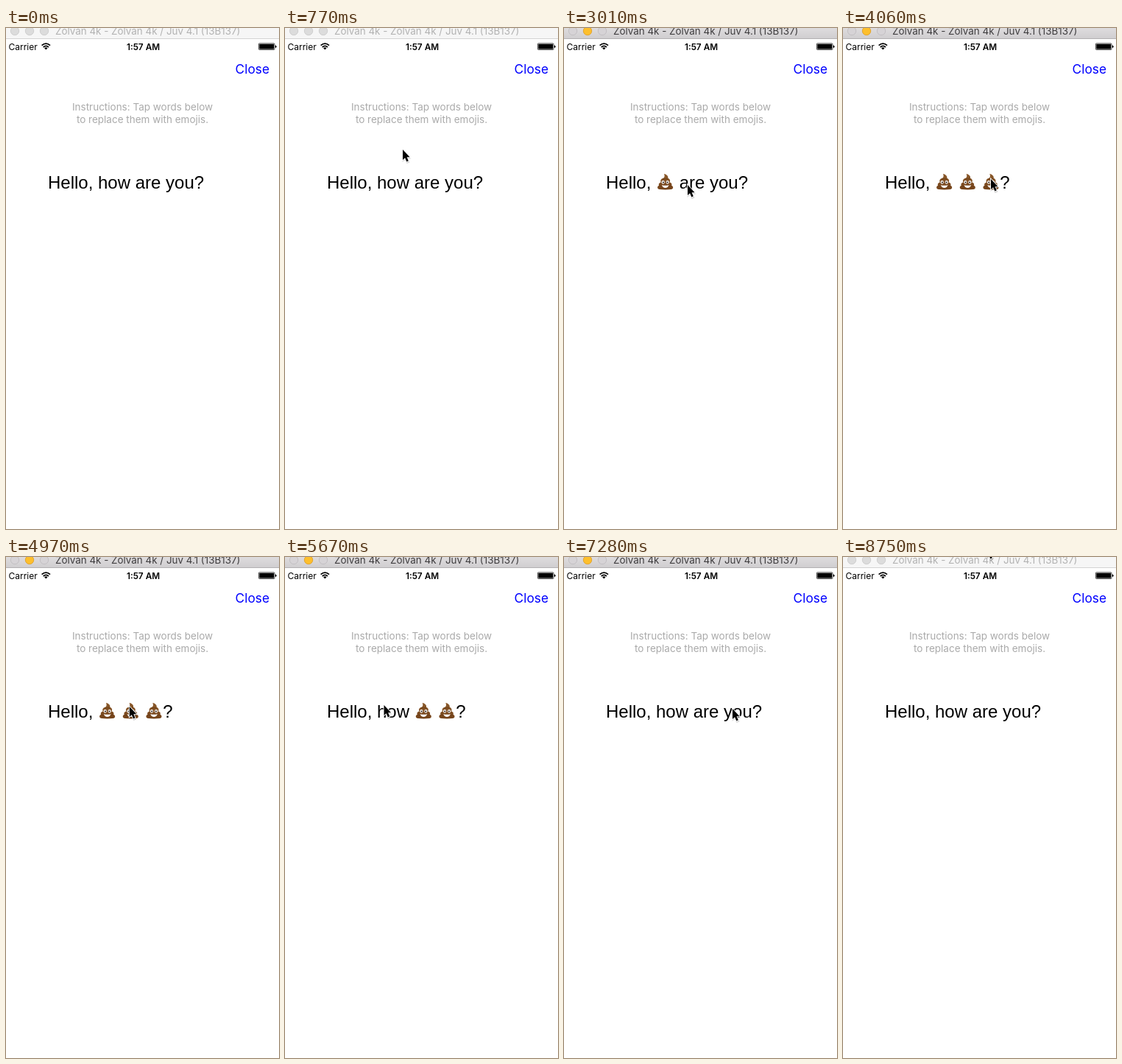
An HTML page that plays this animation: 371 by 680 pixels, repeating every 8890 ms.

```html
<!DOCTYPE html>
<html lang="en">
<head>
<meta charset="utf-8">
<title>Tap words to replace them</title>
<style>
html, body { margin: 0; width: 100%; height: 100%; overflow: hidden; background: #fff; }
svg { display: block; font-family: Inter, Roboto, sans-serif; }
.sentence { font: 24px "Liberation Sans", Arial, sans-serif; }
.hint { font-size: 13.5px; fill: #aaa; text-anchor: middle; }
#bar { fill: url(#chrome); }
#title { font-size: 13.4px; fill: #3e3c3e; }
#rule { fill: #b3b1b3; }
.light { fill: #d6d3d6; stroke: #c3c0c3; }
.middle { fill: #fdbf2d; stroke: #e2a532; }
.idle #bar { fill: #f6f6f6; }
.idle #title { fill: #b2b2b2; }
.idle #rule { fill: #d4d4d4; }
.idle .light { fill: #dcdcdc; stroke: #cfcfcf; }
</style>
</head>
<body>
<svg id="stage" class="idle" width="371" height="680" viewBox="0 0 371 680">
  <defs>
    <linearGradient id="chrome" x2="0" y2="1">
      <stop stop-color="#dedcde"/><stop offset="1" stop-color="#d0ced0"/>
    </linearGradient>
    <linearGradient id="brown" x2="0" y2="1">
      <stop stop-color="#8b5a2b"/><stop offset="1" stop-color="#74431a"/>
    </linearGradient>
    <g id="emoji">
      <path fill="url(#brown)" d="M9.2 0C13 .8 15.3 3 14.6 5.8C17.2 6.7 18.1 9 17 11.4C19.6 12 20.4 14 19.4 15.7C22.2 16.6 22.4 20.5 18.6 21C14 21.6 8 21.6 3.5 21C-.5 20.5-.4 16.6 2.4 15.7C1.4 13.8 2.4 12 4.9 11.4C4 9 5 6.9 7.6 6.1C9.8 5.4 10.6 3 9.2 0Z"/>
      <path fill="none" stroke="#57300f" stroke-width=".8" opacity=".6" d="M7.6 6.7Q11.5 7.5 14.6 5.8M3 16Q4 17.4 6 17.8M16 17.8Q18.4 17.3 19.2 15.9"/>
      <g fill="#fff"><ellipse cx="8" cy="11.3" rx="2.1" ry="2.4"/><ellipse cx="14" cy="11.3" rx="2.1" ry="2.4"/></g>
      <g fill="#2b1a0d"><circle cx="8.2" cy="11.5" r="1.1"/><circle cx="13.8" cy="11.5" r="1.1"/></g>
      <path fill="#fff" d="M6.2 15.2Q11 16.4 15.8 15.2Q14.6 18.9 11 18.9Q7.4 18.9 6.2 15.2Z"/>
    </g>
  </defs>

  <rect width="371" height="680" fill="#fff"/>
  <rect id="bar" width="371" height="14"/>
  <rect id="rule" y="14" width="371" height="1"/>
  <circle class="light" cx="12" cy="4" r="5.7"/>
  <circle class="light middle-light" id="middle" cx="32" cy="4" r="5.7"/>
  <circle class="light" cx="52" cy="4" r="5.7"/>
  <text id="title" x="67" y="9">Zolvan 4k - Zolvan 4k / Juv 4.1 (13B137)</text>

  <text x="3.5" y="29.5" font-size="12">Carrier</text>
  <g fill="none" stroke="#000" stroke-width="1.7">
    <path d="M48.6 23.7Q54.3 18.4 60 23.7M50.7 26Q54.3 22.7 57.9 26"/>
    <path fill="#000" stroke="none" d="M52.1 27.3Q54.3 25.4 56.5 27.3L54.3 29.6Z"/>
  </g>
  <text x="186.5" y="29.5" font-size="11.8" font-weight="600" text-anchor="middle">1:57 AM</text>
  <rect x="343.4" y="20.9" width="21.6" height="8.6" rx="1" fill="none" stroke="#000" stroke-width=".7"/>
  <rect x="344.3" y="21.8" width="19.8" height="6.8"/>
  <path d="M365.8 23.3Q367.6 23.6 367.6 25.2Q367.6 26.8 365.8 27.1Z"/>

  <text x="334.8" y="61.5" font-size="17.3" fill="#00f" text-anchor="middle">Close</text>
  <text class="hint" x="185.5" y="112.3">Instructions: Tap words below</text>
  <text class="hint" x="185.5" y="129.3">to replace them with emojis.</text>

  <g class="sentence" id="sentence"><text x="57" y="218">Hello,</text></g>

  <g id="cursor">
    <path fill="#000" opacity=".16" d="M-.5 1.5V17L3 14L5.5 19L9.5 17.5L7.5 12.5H11.5Z"/>
    <path stroke="#fff" stroke-width="1.8" paint-order="stroke" d="M0 0V14L3.1 11.2L5.4 16.4L7.8 15.3L5.6 10.3H9.6Z"/>
  </g>
</svg>
<script>
const LOOP = 8890, STEP = 70;
const $ = id => document.getElementById(id);
const SVG = "http://www.w3.org/2000/svg";

function add(tag, attrs) {
  const el = document.createElementNS(SVG, tag);
  for (const key in attrs) el.setAttribute(key, attrs[key]);
  return $("sentence").appendChild(el);
}

// Each word is an emoji between its two taps.
const words = [
  { text: "how", width: 44.02, on: 2310, off: 5670 },
  { text: "are", width: 34.69, on: 3290, off: 6510 },
  { text: "you", width: 38.69, on: 4060, off: 7280 }
];
const START = 125, SPACE = 6.67, EMOJI = 25;
for (const word of words) {
  word.label = add("text", { y: 218 });
  word.label.textContent = word.text;
  word.icon = add("use", { href: "#emoji" });
}
const mark = add("text", { y: 218 });
mark.textContent = "?";

const linear = p => p;
const out = p => 1 - (1 - p) ** 2.5;
const smooth = p => p * p * (3 - 2 * p);

// time, x, y, easing towards this point
const path = [
  [420, 164, 3, linear], [770, 160, 165, linear], [1260, 140, 204, out],
  [1400, 140, 212, linear], [1540, 139.5, 213, linear],
  [2450, 139.5, 213, linear], [3010, 168, 213, smooth],
  [3290, 168, 213, linear], [3780, 201, 205, smooth],
  [4550, 201, 205, linear], [5390, 134.5, 201, smooth],
  [5670, 134.5, 201, linear], [6300, 187, 206, smooth],
  [6440, 187, 206, linear], [7070, 229, 206, smooth],
  [7910, 229, 206, linear], [8120, 234, 205, smooth],
  [8610, 195, -14, smooth]
];

function cursorAt(t) {
  const i = path.findIndex(point => point[0] > t);
  if (i < 0) return path[path.length - 1].slice(1, 3);
  const [t0, x0, y0] = path[i - 1];
  const [t1, x1, y1, ease] = path[i];
  const p = ease((t - t0) / (t1 - t0));
  return [x0 + (x1 - x0) * p, y0 + (y1 - y0) * p];
}

function render(time) {
  const t = Math.floor((time % LOOP) / STEP) * STEP;
  const active = t >= 2170 && t < 8750;
  $("stage").setAttribute("class", active ? "" : "idle");
  $("middle").setAttribute("class", active ? "middle" : "light");

  let x = START;
  for (const { label, icon, width, on, off } of words) {
    const replaced = t >= on && t < off;
    label.setAttribute("x", x);
    icon.setAttribute("transform", `translate(${x + 1.7} 198)`);
    label.style.display = replaced ? "none" : "";
    icon.style.display = replaced ? "" : "none";
    x += (replaced ? EMOJI : width) + SPACE;
  }
  mark.setAttribute("x", x - SPACE);

  const shown = t >= path[0][0];
  $("cursor").style.display = shown ? "" : "none";
  if (shown) $("cursor").setAttribute("transform", `translate(${cursorAt(t)})`);
}

const begin = performance.now();
function tick() {
  render(performance.now() - begin);
  requestAnimationFrame(tick);
}
tick();
</script>
</body>
</html>
```
